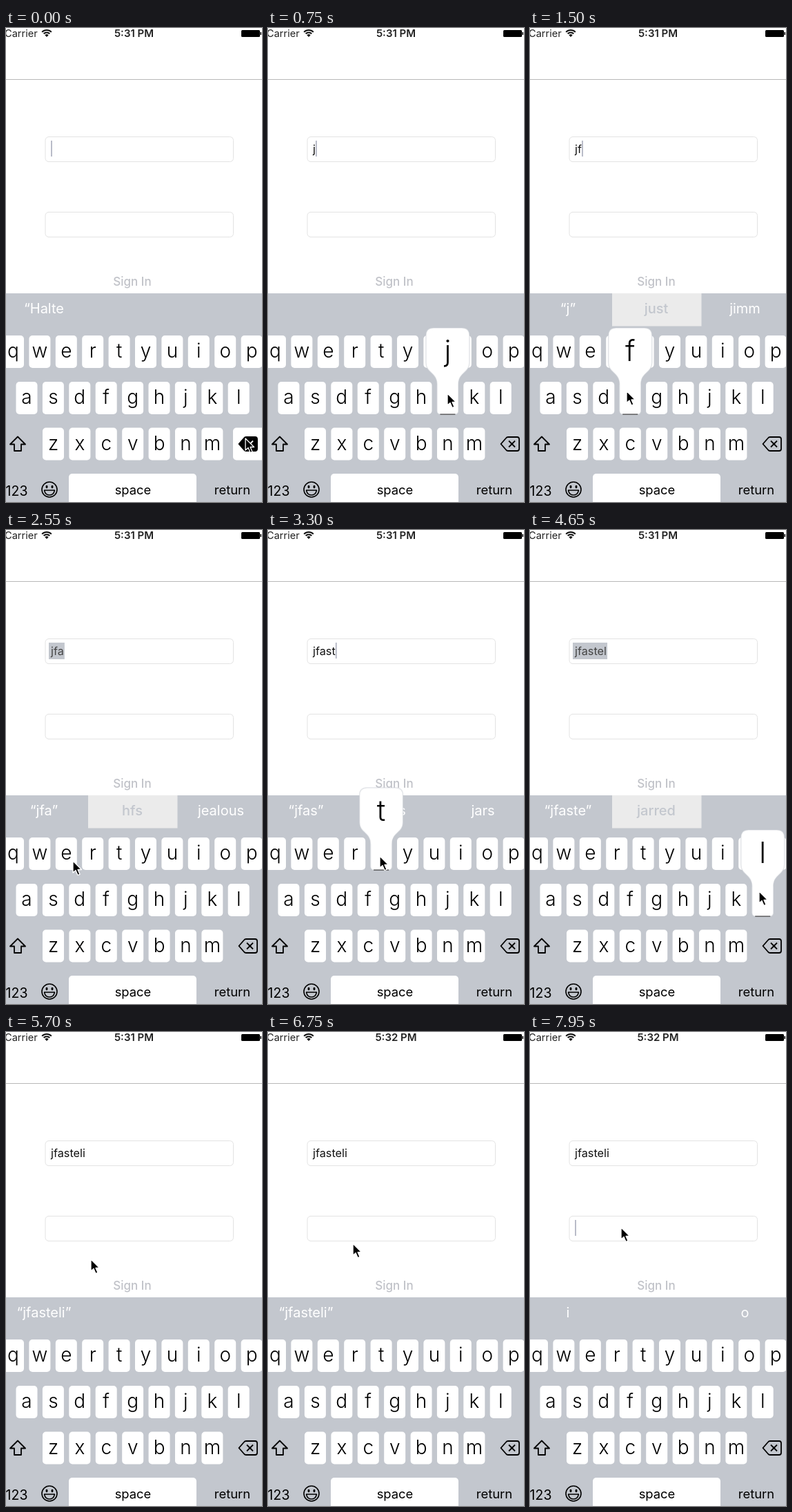
Write an HTML page that moves like this. It is 371 px wide and 686 px high and loops after 8000 ms.

```html
<!DOCTYPE html>
<html lang="en">
<head>
<meta charset="utf-8">
<title>Sign in</title>
<style>
html, body { margin: 0; width: 100%; height: 100%; overflow: hidden; background: #fff; }
svg { display: block; font-family: Inter, Roboto, sans-serif; }
</style>
</head>
<body>
<svg id="stage" width="371" height="686" viewBox="0 0 371 686"></svg>
<script>
const LOOP = 8000, STEP = 150, GREY = '#c3c7ce';
const stage = document.getElementById('stage');
const pen = document.createElement('canvas').getContext('2d');

// typed letters: [time, key]
const presses = [[600, 'j'], [1350, 'f'], [2100, 'a'], [2700, 's'],
  [3150, 't'], [3750, 'e'], [4500, 'l'], [4950, 'i']];

// suggestion bar: [time, left, middle, right, middle highlighted]
const hints = [
  [0, '“Halte', '', ''], [300, '', '', ''],
  [900, '“j”', 'just', 'jimm', 1], [1650, '“jf”', 'if', 'jet', 1],
  [2400, '“jfa”', 'hfs', 'jealous', 1], [2850, '“jfas”', 'has', 'jars'],
  [3450, '“jfast”', 'jarred', 'jarring'], [4050, '“jfaste”', 'jarred', '', 1],
  [5100, '“jfasteli”', '', ''], [7200, 'i', '', 'o']];

// pointer tip: [time, x, y]
const route = [[0, 347, 594], [150, 347, 594], [600, 262, 530], [900, 258, 528],
  [1350, 141, 526], [1650, 139, 525], [2100, 32, 533], [2250, 34, 531],
  [2550, 97, 479], [2700, 71, 526], [2850, 72, 524], [3150, 164, 474],
  [3300, 162, 472], [3750, 94, 468], [3900, 94, 468], [4500, 332, 523],
  [4650, 332, 523], [4950, 282, 472], [5100, 279, 470], [5250, 190, 424],
  [5700, 123, 329], [6300, 116, 320], [7350, 134, 285], [7950, 132, 283]];

const rows = [['qwertyuiop', 10.5, 445], ['asdfghjkl', 30, 512], ['zxcvbnm', 68.5, 578.5]];
const keys = {};
rows.forEach(([letters, x, y], row) => [...letters].forEach((c, i) => {
  keys[c] = { x: x + i * 38.4, y, row };
}));

const rect = (x, y, w, h, fill, r = 0, more = '') =>
  `<rect x="${x}" y="${y}" width="${w}" height="${h}" rx="${r}" fill="${fill}" ${more}/>`;
const text = (s, x, y, size, fill = '#000', weight = 400, anchor = 'middle') =>
  `<text x="${x}" y="${y}" font-size="${size}" fill="${fill}" font-weight="${weight}" text-anchor="${anchor}">${s}</text>`;
const path = (d, fill = 'none', stroke = '#000', width = 1.8) =>
  `<path d="${d}" fill="${fill}" stroke="${stroke}" stroke-width="${width}" stroke-linejoin="round"/>`;
const latest = (list, t) => list.filter(e => e[0] <= t).pop();

function statusBar(t) {
  const arc = r => `M${59 - r * .72} ${12.5 - r * .7}A${r} ${r} 0 0 1 ${59 + r * .72} ${12.5 - r * .7}`;
  return text('Carrier', -2, 13, 14.6, '#222', 400, 'start') +
    path(arc(9.5) + arc(6), 'none', '#111', 2) +
    path('M59 13L56.3 10.2Q59 8 61.7 10.2Z', '#111', 'none') +
    text(t < 6000 ? '5:31 PM' : '5:32 PM', 185.5, 13, 15, '#222', 600) +
    rect(341, 3, 27, 10, '#000', 1.5) + rect(368.5, 6, 1.5, 4, '#000') +
    rect(0, 74, 371, 1, '#b8b8b8');
}

function fields(t, marked) {
  const value = presses.filter(p => p[0] + STEP <= t).map(p => p[1]).join('');
  pen.font = '16.3px Inter, Roboto, sans-serif';
  const width = pen.measureText(value).width;
  const selected = marked && value.length > 2;
  const second = t >= 7500;
  const blink = t < 5250 || Math.floor((t - 5250) / 450) % 2 === 0;
  let out = [157, 266].map(y =>
    rect(57, y + .5, 272.5, 36, '#fff', 5, 'stroke="#e3e3e3"')).join('');
  if (selected) out += rect(62, 163, width + 4, 24, GREY);
  out += text(value, 65, 181, 16.3, selected ? '#444' : '#111', 400, 'start');
  if (blink && !selected)
    out += rect(second ? 65 : 65 + width, second ? 272 : 163, 2, 23, '#b9bcc8');
  return out + text('Sign In', 183, 373, 17, '#c0c2c8', 500);
}

function suggestions([, left, middle, right, marked]) {
  return (marked ? rect(119, 384, 129.5, 47.5, '#ebebeb') : '') +
    text(left, 55, 413, 20, '#fff') +
    text(middle, 183, 413, 20, marked ? GREY : '#fff', marked ? 500 : 400) +
    text(right, 311.5, 413, 20, '#fff');
}

function keyboard(t) {
  let out = '';
  for (const c in keys) {
    const { x, y } = keys[c];
    out += rect(x - 15.5, y, 31, 47, '#fff', 5) + text(c, x, y + 32, 28, '#000', 300);
  }
  const held = t < 300;
  if (held) out += rect(329, 578.5, 50, 47, '#fff', 5);
  out += path('M337.5 602L345 593.5Q346 592 348 592H361Q364 592 364 595V609Q364 612 361 612H348Q346 612 345 610.5Z',
      held ? '#000' : 'none') +
    path('M349 597.5L358 606.5M358 597.5L349 606.5', 'none', held ? '#fff' : '#000') +
    path('M17 591.5L28 602.5H22V612H12V602.5H6Z') +
    text('123', 15.5, 677, 19.5) +
    '<circle cx="63" cy="668" r="11" fill="none" stroke="#000" stroke-width="1.6"/>' +
    '<ellipse cx="59" cy="664" rx="1.5" ry="2.3"/><ellipse cx="67" cy="664" rx="1.5" ry="2.3"/>' +
    path('M55.5 669H70.5Q69 676 63 676T55.5 669Z', 'none', '#000', 1.5) +
    rect(91, 645, 185, 50, '#fff', 5) +
    text('space', 184, 675, 18.4) + text('return', 328, 675, 18.4);
  return out;
}

function bubble(c) {
  const { x, y, row } = keys[c];
  const top = y - (row ? 78 : 72), neck = top + 50, end = y + 47;
  const l = x - 31.5, r = x + 31.5, kl = x - 15.5, kr = x + 15.5;
  return path(`M${l} ${top + 11}Q${l} ${top} ${l + 11} ${top}H${r - 11}Q${r} ${top} ${r} ${top + 11}
    V${neck}C${r} ${neck + 16} ${kr} ${neck + 14} ${kr} ${neck + 32}V${end - 5}Q${kr} ${end} ${kr - 5} ${end}
    H${kl + 5}Q${kl} ${end} ${kl} ${end - 5}V${neck + 32}C${kl} ${neck + 14} ${l} ${neck + 16} ${l} ${neck}Z`,
    '#fff', 'rgba(195,199,206,.45)', 1.5) +
    rect(x - 11, end - .5, 22, 1.2, '#444') + text(c, x, top + 48, 42, '#000', 300);
}

function pointer(t) {
  const i = Math.max(0, route.findIndex(p => p[0] > t) - 1);
  const a = t >= 7950 ? route[route.length - 1] : route[i];
  const b = t >= 7950 ? a : route[i + 1];
  const u = b === a ? 0 : (t - a[0]) / (b[0] - a[0]);
  const k = u * u * (3 - 2 * u);
  const x = a[1] + (b[1] - a[1]) * k, y = a[2] + (b[2] - a[2]) * k;
  return `<g transform="translate(${x} ${y})">` +
    path('M0 0V17L4 13.5 7 20.5 10 19.3 7 12.5H12.5Z', '#000', '#fff', 1.3) + '</g>';
}

function draw(t) {
  const hint = latest(hints, t);
  const press = presses.find(p => t >= p[0] && t < p[0] + 2 * STEP);
  stage.innerHTML = rect(0, 0, 371, 686, '#fff') + statusBar(t) + fields(t, hint[4]) +
    rect(0, 384, 371, 302, GREY) + suggestions(hint) + keyboard(t) +
    (press ? bubble(press[1]) : '') + pointer(t);
}

const start = performance.now();
let shown = -1;
function tick() {
  const t = Math.floor((performance.now() - start) % LOOP / STEP) * STEP;
  if (t !== shown) draw(shown = t);
  requestAnimationFrame(tick);
}
tick();
</script>
</body>
</html>
```
